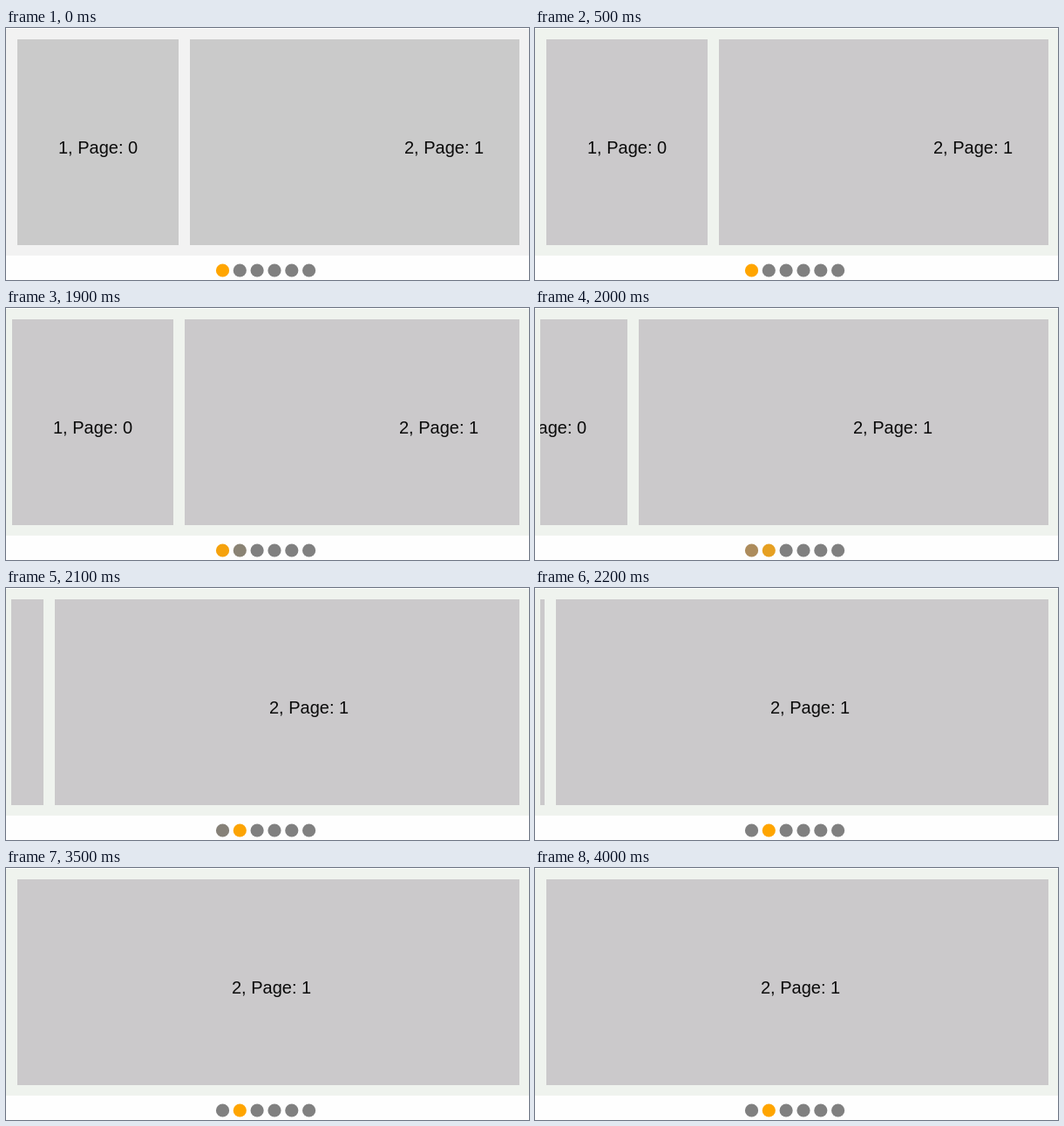
Write an HTML page that moves like this. It is 600x289 px and loops after 4600 ms.

```html
<!DOCTYPE html>
<html lang="en">
<head>
<meta charset="utf-8">
<title>Page slider</title>
<style>
  html, body { margin: 0; width: 100%; height: 100%; overflow: hidden; background: #fefefe; }
  svg { display: block; width: 600px; height: 289px; }
  text { font: 20px "Liberation Sans", Arial, sans-serif; fill: #0a0a0a; }
  .panel, .page, .slide, .old, .new { animation: 4600ms step-end infinite; }
  .panel { fill: #eff3ee; animation-name: panel; }
  .page { fill: #cbc9cb; animation-name: page; }
  .dots { fill: #808080; }
  .slide { animation-name: slide; }
  .old { animation-name: old; }
  .new { animation-name: new; }

  @keyframes panel {
    0% { fill: #f2f2f2; }
    6.52%, 100% { fill: #eff3ee; }
  }
  @keyframes page {
    0% { fill: #cacaca; }
    6.52%, 100% { fill: #cbc9cb; }
  }
  /* eased swipe, sampled every 100 ms */
  @keyframes slide {
    0% { transform: translateX(0); }
    41.3% { transform: translateX(-6px); }
    43.47% { transform: translateX(-92px); }
    45.65% { transform: translateX(-155px); }
    47.82% { transform: translateX(-187px); }
    49.99% { transform: translateX(-197px); }
    52.17%, 100% { transform: translateX(-198px); }
  }
  @keyframes old {
    0% { fill: #ffa500; }
    41.3% { fill: #f5a20d; }
    43.47% { fill: #ad8c5c; }
    45.65% { fill: #868178; }
    47.82%, 100% { fill: #808080; }
  }
  @keyframes new {
    0% { fill: #808080; }
    41.3% { fill: #8a8374; }
    43.47% { fill: #e6a022; }
    45.65% { fill: #fca404; }
    47.82%, 100% { fill: #ffa500; }
  }
</style>
</head>
<body>
<svg viewBox="0 0 600 289">
  <clipPath id="view"><rect x="6" y="0" width="583" height="261"/></clipPath>
  <rect class="panel" y="1" width="600" height="260"/>
  <g clip-path="url(#view)">
    <g class="slide">
      <rect class="page" x="13" y="13" width="185" height="236"/>
      <rect class="page" x="211" y="13" width="576" height="236"/>
      <text x="60" y="144">1, Page: 0</text>
      <text x="457" y="144">2, Page: 1</text>
    </g>
  </g>
  <g class="dots">
    <circle class="old" cx="248.5" cy="278" r="7.6"/>
    <circle class="new" cx="268.3" cy="278" r="7.6"/>
    <circle cx="288.1" cy="278" r="7.6"/>
    <circle cx="308" cy="278" r="7.6"/>
    <circle cx="327.8" cy="278" r="7.6"/>
    <circle cx="347.6" cy="278" r="7.6"/>
  </g>
</svg>
</body>
</html>
```
